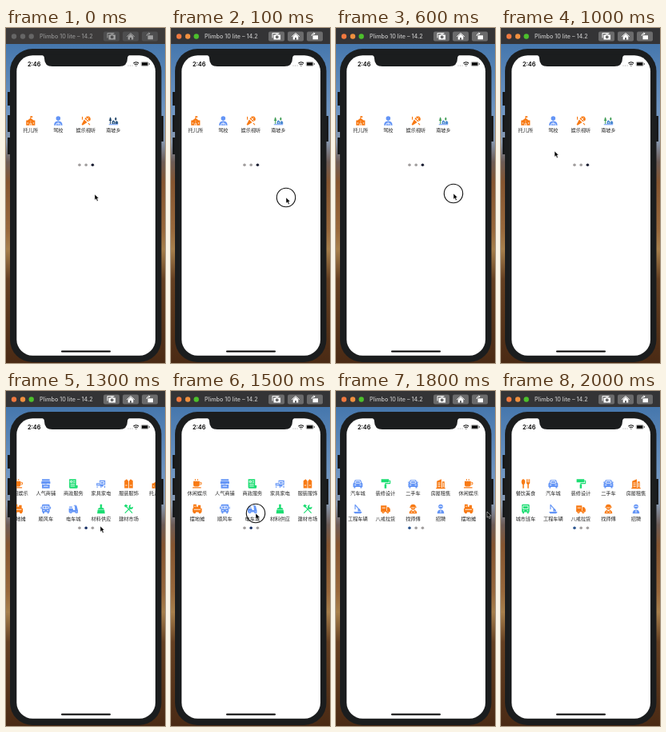
An HTML page for the animation above (2.1 s loop, 199 by 419 pixels).

```html
<!DOCTYPE html>
<html lang="zh">
<head>
<meta charset="utf-8">
<style>
html, body { margin: 0; width: 100%; height: 100%; overflow: hidden; background: #4a2a14 }
svg { display: block }
text { font-family: "Noto Sans CJK SC", "Noto Sans CJK", sans-serif }
.ui { font-family: Inter, sans-serif }
.label { font-size: 6.2px; text-anchor: middle; fill: #222 }
.line { fill: none; stroke-linecap: round; stroke-linejoin: round }
</style>
</head>
<body>
<svg width="199" height="419" viewBox="0 0 199 419">
  <defs>
    <linearGradient id="sky" x1="0" y1="0" x2="0" y2="1">
      <stop offset=".05" stop-color="#4677ad"/>
      <stop offset=".25" stop-color="#7096c2"/>
      <stop offset=".34" stop-color="#8796ab"/>
      <stop offset=".4" stop-color="#6d5c56"/>
      <stop offset=".46" stop-color="#855530"/>
      <stop offset=".6" stop-color="#98683c"/>
      <stop offset=".66" stop-color="#a67f4c"/>
      <stop offset=".75" stop-color="#654022"/>
      <stop offset="1" stop-color="#4a2a14"/>
    </linearGradient>
    <clipPath id="screen"><rect x="13" y="34" width="174" height="376" rx="20"/></clipPath>
  </defs>
  <rect width="199" height="419" fill="url(#sky)"/>
  <path fill="#17191b" d="M2 80h5v17H2zM2 109h5v21H2zM2 137h5v21H2zM192 110h5v32h-5z"/>
  <rect x="5" y="26" width="189.500" height="392" rx="28" fill="#1b1d1e"/>
  <rect x="13.300" y="34.300" width="173.700" height="375.400" rx="20" fill="#fff"/>
  <path fill="#1b1d1e" d="M44 33.500q4 .5 4 4.500q0 10 10 10h84q10 0 10-10q0-4 4-4.500z"/>
  <text class="ui" x="27" y="47.800" font-size="7.300" font-weight="600">2:46</text>
  <g fill="#999"><circle cx="153" cy="47" r=".6"/><circle cx="155.500" cy="47" r=".6"/><circle cx="158" cy="47" r=".6"/></g>
  <path class="line" stroke="#111" stroke-width="1.100" d="M159.800 44q3-2.600 6 0M161.200 45.700q1.600-1.300 3.200 0M162.800 47.200h.1"/>
  <rect x="169.200" y="42.500" width="9" height="5" rx="1.300" fill="none" stroke="#777" stroke-width=".6"/>
  <path d="M170 43.300h7.400v3.400H170zM178.900 44.200h.8v1.600h-.8z"/>
  <rect x="69" y="403.500" width="62" height="2" rx="1"/>
  <g clip-path="url(#screen)"><g id="pages"></g></g>
  <g id="dots"></g>
  <g>
    <rect id="bar" width="199" height="20"/>
    <circle class="light" cx="10" cy="10.500" r="3.200"/>
    <circle class="light" cx="21" cy="10.500" r="3.200"/>
    <circle class="light" cx="31.700" cy="10.500" r="3.200"/>
    <text id="title" class="ui" x="42" y="13" font-size="7.200" font-weight="500">Plimbo 10 lite – 14.2</text>
    <g id="buttons">
      <rect x="122" y="4.500" width="20" height="12" rx="2"/>
      <rect x="146" y="4.500" width="20" height="12" rx="2"/>
      <rect x="170" y="4.500" width="20" height="12" rx="2"/>
    </g>
    <g id="glyphs">
      <path class="line" stroke="currentColor" d="M127 12V6.500h8M151.500 10.500l4.500-4l4.500 4M176 9.500q0-3 4-2.500l-1.300-1M180 7l-1.300 1"/>
      <path fill="currentColor" fill-rule="evenodd" d="M128.500 8.500h2l1-1h2.500l1 1h2v6h-8.500zM134.700 11.300a2 2 0 1 0-4 0a2 2 0 1 0 4 0M152.700 10.500l3.300-3l3.300 3v4h-2.300V12h-2v2.500h-2.300zM177.500 9.200h6.500v5h-6.500z"/>
    </g>
  </g>
  <g id="cursor">
    <circle id="touch" r="11.700" fill="none" stroke="#111" stroke-width="1.100"/>
    <path d="M0 0v7.200l1.700-1.500 1.200 2.800 1.400-.6-1.200-2.800h2.100z" stroke="#fff" stroke-width=".5"/>
  </g>
</svg>
<script>
const $ = id => document.getElementById(id);
const O = '#f87a14', B = '#6495f6', G = '#1bdd72';
const PAGE = 173, COL = 34.55, STEP = 100, STEPS = 21;

const car = 'M-3.8-5h7.600l1.400 3.700 1 1V4h-1v1.500h-2V4h-6.400v1.500h-2V4h-1V-.3l1-1z';
const carLines = 'M-3.500-1.300l.8-2.400h5.400l.8 2.400zM-4 1.500h1.300M2.700 1.500H4';
const bus = 'M-5-4.500q0-1.500 1.500-1.500h7q1.500 0 1.500 1.500V4H4v2H2V4h-4v2h-2V4h-1z';
const head = 'M0-6a2.900 2.900 0 0 1 0 5.800a2.900 2.900 0 0 1 0-5.800z';

// label, colour, filled shape, white lines, coloured lines
const items = [
  [
    ['餐饮美食', O, 'M-3-6c3 0 3 6 .8 7v5h-1.600v-5c-2.200-1-2.200-7 .8-7zM1-6h1v4h.8v-4h1v4h.8v-4h1v5l-1.500 2v5h-1.600v-5l-1.500-2z'],
    ['汽车城', B, car, carLines],
    ['装修设计', G, 'M-5.500-6h10v4.200h-10zM-1.300 1h2.600v5h-2.600z', '', 'M5-4h1v3.500h-6v2'],
    ['二手车', B, car, carLines, 'M-6-2h1M5-2h1'],
    ['房屋租售', O, 'M-5-3.500l6-2.500V6h-6zM2-3h3v9H2z', 'M-3.200-1h2.500M-3.200 1.300h2.500M-3.200 3.600h2.500M3.500-1v5', 'M-5.500 5.700h11'],
    ['城市班车', G, bus, 'M-3.300-4h6.600v3.800h-6.600zM-3 2.200h1M2 2.200h1'],
    ['工程车辆', B, 'M-5.500 3.500h11l-1.500 2.500h-8zM0 0h2.500l1.500 3h-4z', '', 'M3 2L-3.500-5.500V0'],
    ['八戒拉货', O, 'M-6-4.500h7.500v8H-6zM2.200-2.500h2.200l1.800 2.700v3.300h-4zM-3 2a1.900 1.900 0 0 1 0 3.800a1.900 1.900 0 0 1 0-3.800zM3 2a1.900 1.900 0 0 1 0 3.800a1.900 1.900 0 0 1 0-3.800z', 'M-4-1.500h3.500M-3 3.900h.1M3 3.900h.1'],
    ['找师傅', O, 'M-3.500-3q0-3 3.500-3t3.500 3h1v1H3q0 3-3 3t-3-3h-1.500v-1zM-5 6q0-4 3-4.500L0 3l2-1.500Q5 2 5 6z', 'M-1.700-1.600h3.400M-2.500 4h1M1.500 4h1'],
    ['招聘', B, head + 'M-4.500 6q0-5 4.500-5t4.500 5z', 'M-1.500-3.300q1.500-1 3 0M0 2v2.500']
  ], [
    ['休闲娱乐', O, 'M-5-3.500h8v1h1.200q1.800 0 1.800 2t-1.800 2H3q0 2-2 2h-4q-2 0-2-2zM-6 4.300H5v1.400H-6z', 'M3.400-1.200h1v1.500h-1', 'M-2.500-5.800v.8M.5-5.800v.8'],
    ['人气商铺', B, 'M-5-6H5v2H-5zM-5.500-3.500h11l.5 2.500q-1 2-3 .7Q0 1-3 0q-2 1-3-1zM-5 1H5v5H-5z', 'M-2.500 3.200h5'],
    ['商政服务', G, 'M-5.500-6h9v8h2v2.500q0 1.500-1.500 1.500h-8q-1.500 0-1.500-1.500z', 'M-3.500-3.800h2v2h-2zM.2-3.800h1.500M.2-1.800h1.500M-3.500.7h5M-3.500 3h5'],
    ['家具家电', B, 'M-2-4.500h7.500V1.500H3v2H-1V2.500h-5V-1h4z', 'M-.5-2.700h4.300V0H-.5zM-4.500.8H-2', 'M-5 4v.5M0 4v.5M4.800 3v1.500'],
    ['服装服饰', O, 'M-5.500-4L-2.500-6-.4-3.500V5.500h-5.100zM5.500-4L2.500-6 .4-3.500V5.500h5.100z', 'M-3.800 2h1.500M2.300 2h1.500'],
    ['摆地摊', O, 'M-5-6h4v3h2v-2h3.500v4H6V4H-6V-1h1zM-3.500 2.500a1.700 1.700 0 0 1 0 3.400a1.700 1.700 0 0 1 0-3.400zM3.500 2.500a1.700 1.700 0 0 1 0 3.400a1.700 1.700 0 0 1 0-3.400z', 'M-3.500-3.500h1M-4 .7h8'],
    ['顺风车', B, bus, 'M-3.300-3.600h6.600v3h-6.600zM0-3.500v3M-3 2h1M2 2h1', 'M-6-2.500v2M6-2.500v2'],
    ['电车城', B, 'M-6-1h5l1 2.500h2L1.700-4h2.600L6 2.500 3.500 4H-6zM-3.500 1.700a2 2 0 0 1 0 4a2 2 0 0 1 0-4zM4 1.700a2 2 0 0 1 0 4a2 2 0 0 1 0-4z', 'M-3.500 3.700h.1M4 3.700h.1', 'M1-4.500h2.500M-5-2.500h3'],
    ['材料供应', G, 'M-1.300-6h2.600v4.500H3L4.500 1h-9L-3-1.500h1.700zM-4.500 1.500h9L5 6H-5z'],
    ['建材市场', G, 'M-6-4l2-2 3 1.500-2.500 2.500zM3-6l-1 3 1 1 3-1-1 3-3 .5-2-2 .5-3z', '', 'M-3-3L4.500 5M2-1.500L-4.500 5']
  ], [
    ['托儿所', O, 'M-.5-6h3v1.800H.5v1L4-.5h1.800V6H-5.800V-.5H-4l3.500-2.700z', 'M-1 5.800V3.500q1-1.500 2 0v2.300M0 .5h.1M-3.700 2.500v1M3.700 2.500v1'],
    ['驾校', B, head + 'M-5.500 6q0-5.500 5.500-5.500T5.500 6z', 'M-3 5.500q0-2.700 3-2.700t3 2.700M0 3v2'],
    ['娱乐视听', O, 'M1-5.500q3-1.200 4.500 1t0 4.500L2.500 1-1.500-2.700zM-2.200-1.700L1.700 2l-5.900 4-1.300-1.200z', 'M.5-4L4 0M3.500-4L1-1', 'M-4.500-5v3M3.500 3.500L5 5'],
    ['南坡乡', B, 'M-2 1L0-1 2 1v3h-4zM2.500 1.500l1.700-1.500L6 1.500V4H2.500z', 'M0 2v1', 'M-5.500 4.800h11']
  ]
];

const line = (d, color, width = .9) =>
  d ? `<path class="line" d="${d}" stroke="${color}" stroke-width="${width}"/>` : '';

function cell([label, color, shape, white, strokes], page, i) {
  const x = page * PAGE + 30.8 + i % 5 * COL, y = i < 5 ? 116.5 : 148;
  const trees = label === '南坡乡'
    ? '<path id="trees" d="M-4-5l1.300 2.500h-.6l1.300 2.500h-1.500v4h-1V0H-6l1.300-2.500h-.6zM3-5l1.300 2.500L3.500-.5h-1L1.700-2.500z"/>' : '';
  return `<g transform="translate(${x} ${y})"><g transform="translate(0 -.4) scale(.96)">` +
    `<path d="${shape}" fill="${color}"/>` + line(white, '#fff') + line(strokes, color, 1.2) + trees +
    `</g><text class="label" y="13.800">${label}</text></g>`;
}

$('pages').innerHTML = items.map((list, p) => list.map((item, i) => cell(item, p, i)).join('')).join('');
$('dots').innerHTML = [92, 100.2, 108.4].map(x => `<circle cx="${x}" cy="171.200" r="1.800"/>`).join('');
const house = $('trees').parentNode.firstChild;
const lights = document.querySelectorAll('.light');

// step, pointer x, pointer y, pressed, scroll
const keys = [
  [0, 111, 208, 0, 346], [1, 144, 212, 1, 346], [6, 147, 207, 1, 346],
  [7, 138, 200, 0, 346], [10, 67, 154, 0, 346], [11, 72, 158, 1, 341],
  [12, 114, 167, 1, 285], [13, 118, 169, 0, 188.5], [14, 107, 162, 0, 174],
  [15, 106, 153, 1, 171], [16, 155, 148, 1, 122], [17, 177, 147, 1, 99],
  [18, 189, 151, 0, 38], [19, 211, 160, 0, 9], [20, 230, 170, 0, 0]
];

function pose(step) {
  const n = keys.findLastIndex(k => k[0] <= step), a = keys[n], b = keys[n + 1] || a;
  const u = (step - a[0]) / (b[0] - a[0] || 1);
  return a.map((v, i) => i === 3 ? v : v + (b[i] - v) * u);
}

function draw(step) {
  const [, x, y, pressed, scroll] = pose(step), active = step > 0;
  $('pages').setAttribute('transform', `translate(${-scroll} 0)`);
  $('cursor').setAttribute('transform', `translate(${x} ${y})`);
  $('touch').style.display = pressed ? '' : 'none';

  const current = Math.round(scroll / PAGE);
  [...$('dots').children].forEach((dot, i) =>
    dot.setAttribute('fill', i === current ? ['#2c5690', '#1c3468', '#1d2034'][i] : '#a19e9e'));

  lights.forEach((el, i) => el.setAttribute('fill', active ? ['#f2793f', '#f0903f', '#4cc02c'][i] : '#666'));
  $('bar').setAttribute('fill', active ? '#343436' : '#3d3b3b');
  $('title').setAttribute('fill', active ? '#c4c4c4' : '#909090');
  $('buttons').setAttribute('fill', active ? '#6b6b6c' : '#4e4e4f');
  $('glyphs').setAttribute('color', active ? '#fff' : '#a0a0a0');
  $('trees').setAttribute('fill', active ? '#3f9d55' : '#193f65');
  house.setAttribute('fill', active ? '#4d8bd0' : '#315b86');
}

const start = performance.now();
function tick() {
  draw(Math.floor((performance.now() - start) / STEP) % STEPS);
  requestAnimationFrame(tick);
}
tick();
</script>
</body>
</html>
```
